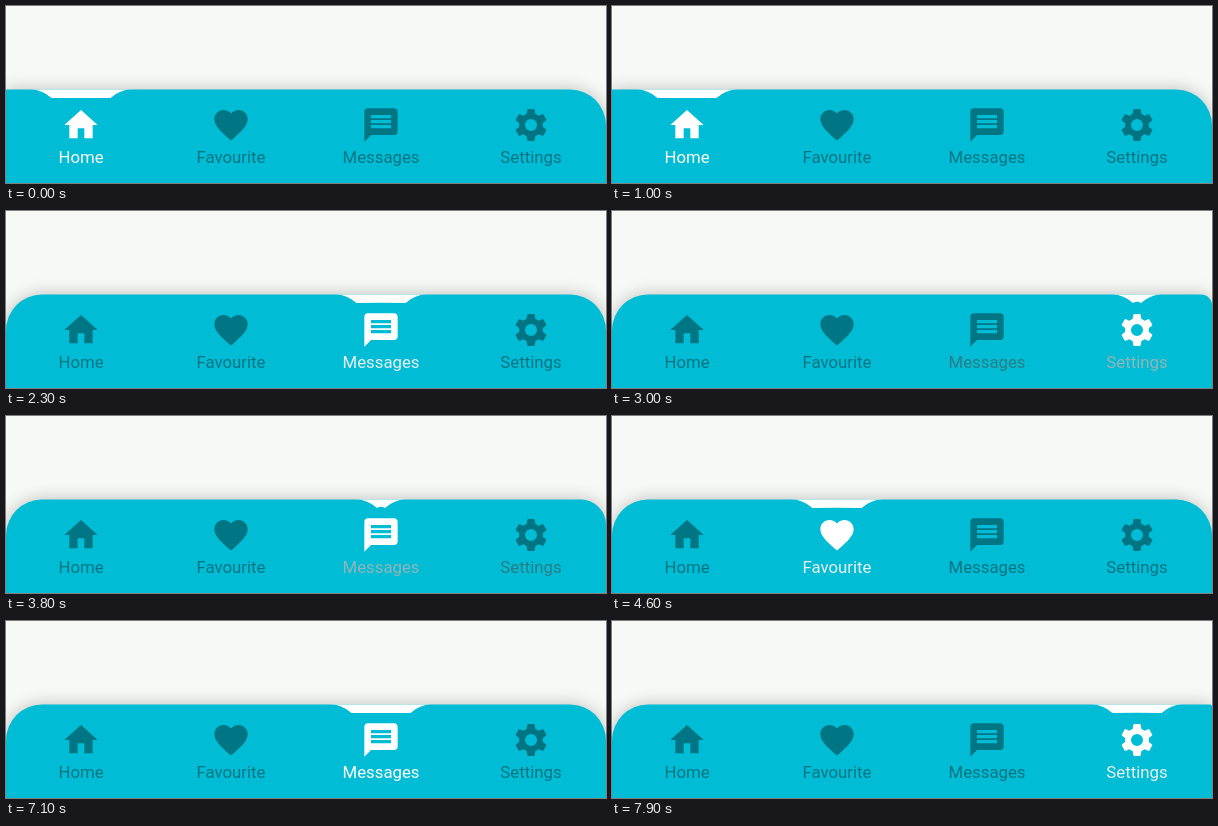
An HTML page with a canvas that plays this animation: 600 px wide and 177 px high, repeating every 8 s.

```html
<!DOCTYPE html>
<html lang="en">
<head>
<meta charset="utf-8">
<title>Bottom bar</title>
<style>
html, body { margin: 0; width: 100%; height: 100%; overflow: hidden; background: #f7f9f6; }
canvas { display: block; width: 600px; height: 177px; }
</style>
</head>
<body>
<canvas id="stage"></canvas>
<script>
const W = 600, H = 177, LOOP = 8000, STEP = 100;
const TAB = 150, TOP = 83.5, DIP = 92, RADIUS = 36, MORPH = 400;
const TEAL = '#00bcd4', DIM = 'rgba(0,0,0,.38)';
const LABELS = ['Home', 'Favourite', 'Messages', 'Settings'];

// [time of tap, chosen tab]
const TAPS = [
  [-1000, 0], [320, 0], [1120, 1], [1920, 2], [2720, 3], [3520, 2],
  [4220, 1], [5020, 0], [5920, 1], [6700, 2], [7520, 3]
];

const canvas = document.getElementById('stage');
const ctx = canvas.getContext('2d');
const ratio = window.devicePixelRatio || 1;
canvas.width = W * ratio;
canvas.height = H * ratio;

function gear() {
  const path = new Path2D();
  const point = (r, deg) => {
    const a = deg * Math.PI / 180;
    path.lineTo(12 + r * Math.cos(a), 12 + r * Math.sin(a));
  };
  for (let deg = -90; deg < 270; deg += 60) {
    point(7.2, deg - 21);
    point(9.3, deg - 14);
    point(9.75, deg - 11);
    point(9.75, deg + 11);
    point(9.3, deg + 14);
    point(7.2, deg + 21);
  }
  path.closePath();
  path.moveTo(15.6, 12);
  path.arc(12, 12, 3.6, 0, Math.PI * 2);
  return path;
}

const ICONS = [
  new Path2D('M10 20v-6h4v6h5v-8h3L12 3 2 12h3v8z'),
  new Path2D('M12 21.35l-1.45-1.32C5.4 15.36 2 12.28 2 8.5 2 5.42 4.42 3 7.5 3c1.74 0 3.41.81 4.5 2.09C13.09 3.81 14.76 3 16.5 3 19.58 3 22 5.42 22 8.5c0 3.78-3.4 6.86-8.55 11.54z'),
  new Path2D('M20 2H4c-1.1 0-2 .9-2 2v18l4-4h14c1.1 0 2-.9 2-2V4c0-1.1-.9-2-2-2zM6 12h12v2H6zM6 9h12v2H6zM6 6h12v2H6z'),
  gear()
];

const mix = (a, b, p) => a + (b - a) * p;

function stateAt(t) {
  let i = TAPS.length - 1;
  while (TAPS[i][0] > t) i--;
  const [start, now] = TAPS[i];
  const before = i ? TAPS[i - 1][1] : now;
  return { now, before, p: Math.min(1, (t - start) / MORPH) };
}

// How far a tab is selected, 0 to 1
function level(tab, { now, before, p }) {
  return mix(+(tab === before), +(tab === now), p);
}

function drawBar(left, right) {
  ctx.save();
  ctx.shadowColor = 'rgba(0,0,0,.24)';
  ctx.shadowBlur = 17 * ratio;
  ctx.fillStyle = TEAL;
  ctx.beginPath();
  ctx.moveTo(0, H + 30);
  ctx.lineTo(0, TOP + left);
  ctx.arcTo(0, TOP, left, TOP, left);
  ctx.lineTo(W - right, TOP);
  ctx.arcTo(W, TOP, W, TOP + right, right);
  ctx.lineTo(W, H + 30);
  ctx.fill();
  ctx.restore();
}

// The two flanks cross while the notch is still narrow
function drawNotch(x, p) {
  const a = 50 * p * p, b = a - 20.5;
  ctx.fillStyle = '#fff';
  ctx.beginPath();
  ctx.moveTo(x - a, TOP);
  ctx.quadraticCurveTo(x - a + 11, TOP, x - b, DIP);
  ctx.quadraticCurveTo(x, DIP - 8 * (1 - p), x + b, DIP);
  ctx.quadraticCurveTo(x + a - 11, TOP, x + a, TOP);
  ctx.fill();
}

function drawTab(i, active, lit) {
  const x = TAB * (i + 0.5), scale = 40 / 24;
  ctx.save();
  ctx.translate(x - 20, 99);
  ctx.scale(scale, scale);
  ctx.fillStyle = active ? '#fff' : DIM;
  ctx.fill(ICONS[i], 'evenodd');
  ctx.restore();

  const c = Math.round(255 * lit);
  ctx.fillStyle = `rgba(${c},${c},${c},${mix(0.38, 1, lit)})`;
  ctx.fillText(LABELS[i], x, 157);
}

function draw(t) {
  const state = stateAt(t);
  ctx.setTransform(ratio, 0, 0, ratio, 0, 0);
  ctx.fillStyle = '#f7f9f6';
  ctx.fillRect(0, 0, W, H);
  drawBar(RADIUS * (1 - level(0, state)), RADIUS * (1 - level(3, state)));
  drawNotch(TAB * (state.now + 0.5), state.p);
  ctx.font = '16.8px Roboto, sans-serif';
  ctx.textAlign = 'center';
  LABELS.forEach((_, i) => drawTab(i, i === state.now, level(i, state)));
}

const begin = performance.now();
function tick() {
  const t = (performance.now() - begin) % LOOP;
  draw(Math.floor(t / STEP) * STEP);
  requestAnimationFrame(tick);
}
tick();
</script>
</body>
</html>
```
